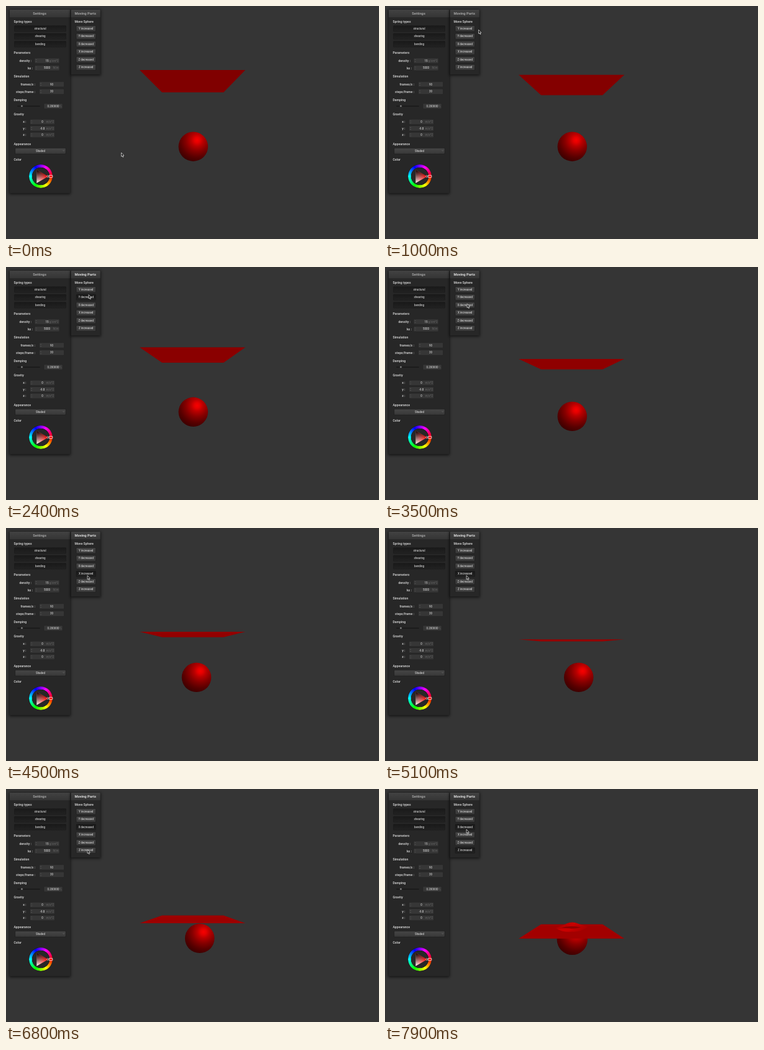
Animation of 600x375 px, one loop 8 s. Source, as an HTML page:

```html
<!DOCTYPE html>
<html lang="en">
<head>
<meta charset="utf-8">
<title>Cloth simulation</title>
<style>
html, body { margin: 0; width: 100%; height: 100%; overflow: hidden; background: #353535; }
svg { position: absolute; left: 0; top: 0; width: 600px; height: 375px; }
text { font-family: Roboto, "Open Sans", sans-serif; font-weight: 700; }
#hue {
  position: absolute; left: 36.5px; top: 255.2px; width: 38px; height: 38px; border-radius: 50%;
  background: conic-gradient(from 90deg, red, yellow, lime, cyan, blue, magenta, red);
  -webkit-mask: radial-gradient(circle, transparent 14px, #000 14.5px);
  mask: radial-gradient(circle, transparent 14px, #000 14.5px);
}
</style>
</head>
<body>
<svg viewBox="0 0 600 375">
  <defs>
    <filter id="blur" x="-20%" y="-20%" width="140%" height="140%"><feGaussianBlur stdDeviation="2.2"/></filter>
    <linearGradient id="head" x2="0" y2="1"><stop stop-color="#424242"/><stop offset="1" stop-color="#353535"/></linearGradient>
    <linearGradient id="up" x2="0" y2="1"><stop stop-color="#464646"/><stop offset="1" stop-color="#383838"/></linearGradient>
    <linearGradient id="down" x2="0" y2="1"><stop stop-color="#191919"/><stop offset="1" stop-color="#222"/></linearGradient>
    <radialGradient id="ball" cx=".63" cy=".28" r=".8">
      <stop stop-color="#f80000"/><stop offset=".12" stop-color="#e40000"/><stop offset=".26" stop-color="#b80000"/>
      <stop offset=".48" stop-color="#860000"/><stop offset=".72" stop-color="#5a0000"/><stop offset="1" stop-color="#340000"/>
    </radialGradient>
    <linearGradient id="dome" x2="1" y2=".3">
      <stop stop-color="#a00000"/><stop offset=".55" stop-color="#c80000"/><stop offset="1" stop-color="#ac0000"/>
    </linearGradient>
    <linearGradient id="tint" gradientUnits="userSpaceOnUse" x1="12.4" y1="0" x2="-6.2" y2="10.7">
      <stop stop-color="#f00"/><stop offset="1" stop-color="#fff"/>
    </linearGradient>
    <linearGradient id="shade" gradientUnits="userSpaceOnUse" x1="3.1" y1="5.4" x2="-6.2" y2="-10.7">
      <stop stop-opacity="0"/><stop offset="1"/>
    </linearGradient>
  </defs>
  <circle id="sphere" fill="url(#ball)"/>
  <polygon id="cloth"/>
  <g id="bump">
    <path d="M-27 -3Q-14 -7 -9 -10Q0 -14 9 -10Q16 -7 25 -5Q14 4 0 3Q-16 5 -27 -3Z" fill="url(#dome)"/>
    <path d="M-18 -3Q-4 -8 14 -4Q4 -1 -4 -2Z" fill="#900000"/>
    <path d="M-24 -1Q-10 -3 2 -1Q-8 3 -16 2Z" fill="#ca0000"/>
  </g>
  <g id="ui"></g>
</svg>
<div id="hue"></div>
<svg viewBox="0 0 600 375">
  <g transform="translate(55.5 274.2)">
    <path d="M12.4 0L-6.2 10.7V-10.7Z" fill="url(#tint)"/>
    <path d="M12.4 0L-6.2 10.7V-10.7Z" fill="url(#shade)"/>
    <g fill="none" stroke="#000" stroke-opacity=".35" stroke-width=".5"><circle r="19"/><circle r="14.2"/></g>
    <rect x="13.7" y="-1.8" width="5.6" height="3.6" rx=".6" fill="none" stroke="#fff" stroke-width=".8"/>
    <circle cx="11.7" r="1.5" fill="none" stroke="#ddd" stroke-width=".6"/>
  </g>
  <path id="cursor" d="M0 0V6.2L1.4 5L2.4 7.3L3.4 6.9L2.4 4.7H4.3Z" fill="#111" stroke="#eee" stroke-width=".7" stroke-linejoin="round"/>
</svg>
<script>
const $ = id => document.getElementById(id);

function set(el, attrs) {
  for (const k in attrs) el.setAttribute(k, attrs[k]);
  return el;
}
const add = (tag, attrs) =>
  $('ui').appendChild(set(document.createElementNS('http://www.w3.org/2000/svg', tag), attrs));
const box = (x, y, width, height, fill, more) => add('rect', { x, y, width, height, fill, rx: 1, ...more });

// y is the middle of the line
function write(str, x, y, size, fill, anchor = 'start', weight = 700) {
  add('text', { x, y: y + size * .35, fill, 'font-size': size, 'text-anchor': anchor,
    style: `font-weight:${weight}` }).textContent = str;
  return $('ui').lastChild;
}
const label = (str, x, y, anchor) => write(str, x, y, 5.15, '#c6c6c6', anchor);
const small = (str, x, y, fill = '#c8c8c8', anchor = 'middle') => write(str, x, y, 4.45, fill, anchor, 500);

function panel(x, y, w, h, title) {
  box(x - 1, y, w + 2, h + 2, '#000', { filter: 'url(#blur)', opacity: .6 });
  box(x, y, w, h, '#272727');
  box(x, y, w, 12.4, 'url(#head)');
  box(x, y + 12.2, w, .4, '#191919');
  return write(title, x + w / 2 - .4, y + 6.2, 5.76, '#a4a4a4', 'middle');
}
function button(str, x, y, w, face = 'up') {
  const el = box(x, y - 4.6, w, 9.3, `url(#${face})`, { stroke: '#171717', 'stroke-width': .5 });
  small(str, x + w / 2, y);
  return el;
}
function field(x, y, w, value, unit) {
  box(x, y - 4.2, w, 8.4, '#363636', { stroke: '#202020', 'stroke-width': .4 });
  small(value, x + w / 2, y);
  if (unit) small(unit, x + w - 1.5, y, '#5e5e5e', 'end');
}
// Rows: name, right end of name, value, unit
function group(title, top, x, first, pitch, rows) {
  label(title, 12.5, top);
  rows.forEach(([name, end, value, unit], i) => {
    const y = first + i * pitch;
    label(name, end, y, 'end');
    field(x, y, 40, value, unit);
    add('path', { d: `M${x + 1.7} ${y - 1}l.9 -1l.9 1m-1.8 2l.9 1l.9 -1`, stroke: '#777', 'stroke-width': .4, fill: 'none' });
  });
}
const rowY = i => 36.3 + i * 12.5;

panel(6, 6, 97, 295, 'Settings');
const movingTitle = panel(104.6, 6, 47, 104, 'Moving Parts');

label('Spring types', 12.5, 25.5);
['structural', 'shearing', 'bending'].forEach((s, i) => button(s, 13.5, rowY(i), 83, 'down'));
group('Parameters', 75.5, 46, 88, 11.8, [['density :', 41, '15', 'g/cm^2'], ['ks :', 43, '5000', 'N/m']]);
group('Simulation', 113.5, 53.5, 126, 11.8, [['frames/s :', 47, '90'], ['steps/frame :', 47, '30']]);
label('Damping', 12.5, 151.5);
box(18, 160.4, 37, 1.5, '#191919');
add('circle', { cx: 25.5, cy: 161, r: 1.6, fill: '#999', stroke: '#333', 'stroke-width': 1 });
field(61, 161.2, 30, '0.200000', '%');
group('Gravity', 174.3, 38.5, 186.5, 10.5,
  [['x :', 32.5, '0', 'm/s^2'], ['y :', 32.5, '-9.8', 'm/s^2'], ['z :', 32.5, '0', 'm/s^2']]);
label('Appearance', 12.5, 222.6);
button('Shaded', 14.7, 233.4, 81.5);
add('path', { d: 'M91.7 232.4l.9 .9l.9 -.9', stroke: '#999', 'stroke-width': .5, fill: 'none' });
label('Color', 12.5, 247.5);

label('Move Sphere', 110.5, 25.5);
// Each key shifts the sphere by x, y and radius
const keys = [
  ['Y increased', 0, -7.1, 0], ['Y decreased', 0, 7.1, 0], ['X decreased', -5.2, 0, 0],
  ['X increased', 5.2, 0, 0], ['Z decreased', 0, -2, -.9], ['Z increased', 0, 2, .9],
].map(([name, ...step], i) => ({ step, face: button(name, 113, rowY(i), 31.4) }));

// The pointer stops at height y and clicks a key; the key stays dark until let go
const visits = [
  { key: 1, y: 44.6, at: 1700, gap: 1200, clicks: 2, until: 3300 },
  { key: 3, y: 76.5, at: 4300, gap: 600, clicks: 3, until: 5600 },
  { key: 2, y: 60, at: 6200, gap: 0, clicks: 1, until: 8000 },
  { key: 5, y: 97.5, at: 6900, gap: 0, clicks: 1, until: 8000 },
  { key: 2, y: 65, at: 7400, gap: 350, clicks: 2, until: 8000 },
];

const stops = [{ t: 0, x: 185.5, y: 236 }, { t: 1000, x: 150.6, y: 38.3 }];
for (const { y, at, gap, clicks } of visits) {
  const x = y < 50 ? 133 : 131;
  stops.push({ t: at - 100, x, y }, { t: at + gap * (clicks - 1), x, y });
}
stops.push({ ...stops[stops.length - 1], t: 8000 });

function pointerAt(t) {
  const i = stops.findIndex(s => s.t > t), a = stops[i - 1], b = stops[i];
  const u = (t - a.t) / (b.t - a.t);
  return `translate(${a.x + (b.x - a.x) * u} ${a.y + (b.y - a.y) * u})`;
}

function sphereAt(t) {
  const pos = [301.2, 226.2, 23.7];
  for (const { key, at, gap, clicks } of visits)
    for (let i = 0; i < clicks; i++)
      if (t >= at + i * gap) keys[key].step.forEach((d, k) => pos[k] += d);
  return pos;
}

// Falls with drag towards a steady speed
const frontAt = s => 103 + 24.3 * (s - 2.4 * (1 - Math.exp(-s / 3)));
const HORIZON = 187.1, DEPTH = .572;

function draw(t) {
  const [x, y, r] = sphereAt(t);
  set($('sphere'), { cx: x, cy: y, r });

  const front = frontAt(t / 1000), drop = front - HORIZON, back = HORIZON + drop * DEPTH;
  set($('cloth'), {
    points: `215,${front} 385,${front} 350,${back} 251,${back}`,
    fill: `rgb(${128 + t * .0043},0,0)`,
  });

  const rise = Math.min(1, Math.max(0, (t - 7250) / 650));
  set($('bump'), {
    transform: `translate(${x} ${HORIZON + drop * .735}) scale(1 ${rise})`,
    opacity: Math.min(1, rise * 2),
  });

  keys.forEach(({ face }, i) => {
    const held = visits.some(v => v.key === i && t >= v.at && t < v.until);
    set(face, { fill: held ? 'url(#down)' : 'url(#up)' });
  });
  set(movingTitle, { fill: t >= visits[0].at ? '#dedede' : '#a4a4a4' });
  set($('cursor'), { transform: pointerAt(t) });
}

const start = performance.now();
function tick() {
  const t = (performance.now() - start) % 8000;
  draw(Math.floor(t / 100) * 100);
  requestAnimationFrame(tick);
}
tick();
</script>
</body>
</html>
```
